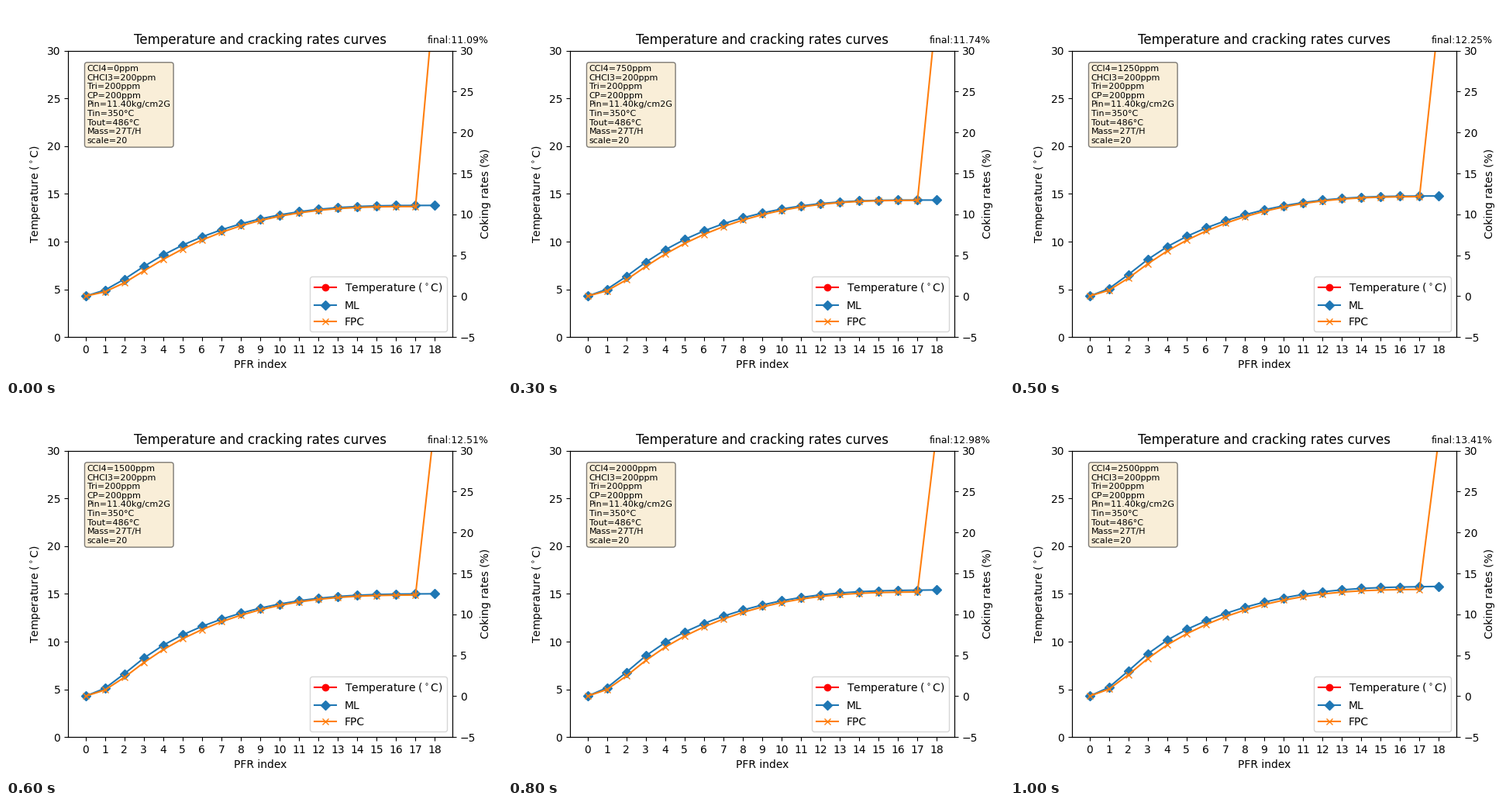
Recreate the animation shown at these times as a matplotlib script. Size 640 by 480 pixels, loop 1.1 s.

```python
import numpy as np
import matplotlib.pyplot as plt
from matplotlib.animation import FuncAnimation

STEP = 250          # ppm of CCl4 added per frame
FRAMES = 11
index = np.arange(19)

# Final ML rate (%) at a few CCl4 levels (1000 ppm)
LEVELS = [0, 0.25, 0.75, 1, 1.5, 2, 2.5]
FINALS = [11.09, 11.43, 11.74, 11.98, 12.51, 12.98, 13.41]


def rise(x, width, power):
    """Smooth step from 0 to 1."""
    return 1 - np.exp(-(x / width) ** power)


def fpc_rates(c):
    """Growth with a soft start that levels off at reactor 17."""
    left = np.clip(17 - index, 0, None) / 12
    base = 1.1 * np.logaddexp(0, (10.95 - 5.2 * left ** 2.75) / 1.1)
    gain = 1.06 * c - 0.1 * c ** 2
    y = base + gain * (0.88 * rise(index, 2.3, 2) + 0.009 * index)
    y[0] = 0
    return y


def ml_rates(c):
    """FPC curve with an early lead, tilted to reach the final rate."""
    lead = 0.36 * index ** 2 * np.exp(-index / 1.65)
    surplus = 4 * c * np.exp(-4 * c) * rise(index, 5, 4)
    y = fpc_rates(c) + lead + surplus
    return y + (np.interp(c, LEVELS, FINALS) - y[-1]) * index / 18


def spike(c):
    return 37.4 - 2.8 * c + 0.2 * c ** 2


def settings(ppm):
    return "\n".join([
        f"CCl4={ppm}ppm", "CHCl3=200ppm", "Tri=200ppm", "CP=200ppm",
        "Pin=11.40kg/cm2G", "Tin=350°C", "Tout=486°C", "Mass=27T/H",
        "scale=20",
    ])


fig, ax = plt.subplots(figsize=(6.4, 4.8), dpi=100)
ax.set_title("Temperature and cracking rates curves")
ax.set_xlabel("PFR index")
ax.set_ylabel(r"Temperature ($^\circ$C)")
ax.set_xlim(-0.9, 18.9)
ax.set_ylim(0, 30)
ax.set_xticks(index)

ax2 = ax.twinx()
ax2.set_ylabel("Coking rates (%)")
ax2.set_ylim(-5, 30)

temp, = ax.plot([], [], "r-o", label=r"Temperature ($^\circ$C)")
ml, = ax2.plot([], [], "-D", color="C0", label="ML")
fpc, = ax2.plot([], [], "-x", color="C1", label="FPC")
ax2.legend(handles=[temp, ml, fpc], loc="lower right")

info = ax.text(0.05, 0.95, "", transform=ax.transAxes, fontsize=8, va="top",
               bbox=dict(boxstyle="round", facecolor="wheat", alpha=0.5))
final = ax.text(17.6, 30.8, "", fontsize=9)


def update(i):
    ppm = i * STEP
    c = ppm / 1000
    y = ml_rates(c)
    ml.set_data(index, y)
    fpc.set_data(index, np.append(fpc_rates(c)[:-1], spike(c)))
    info.set_text(settings(ppm))
    final.set_text(f"final:{y[-1]:.2f}%")
    return ml, fpc, info, final


anim = FuncAnimation(fig, update, frames=FRAMES, interval=100, repeat=True,
                     repeat_delay=0)
plt.show()
```
